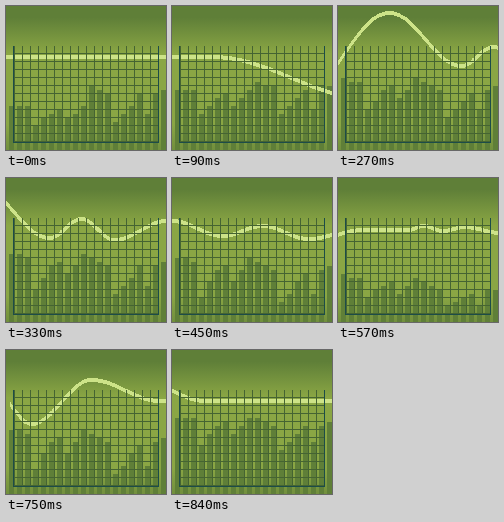
Recreate the animation shown at these times as an HTML page with a canvas. Size 160x144 px, loop 0.87 s.

```html
<!DOCTYPE html>
<html lang="en">
<head>
<meta charset="utf-8">
<title>Chart</title>
<style>
html, body { margin: 0; height: 100%; overflow: hidden; background: #5f7f38; }
canvas { display: block; width: 100vw; height: 100vh; image-rendering: pixelated; }
</style>
</head>
<body>
<canvas id="stage" width="160" height="144"></canvas>
<script>
const W = 160, H = 144, LOOP = 870, STEP = 30, SPEED = 40 / STEP;
const DARK = '#5f7f38', LIGHT = '#8aa644', GLOW = '#cde388', GRID = '#456432', FRAME = '#1c4c48';
const LEFT = 7, RIGHT = 152, TOP = 40, BASE = 136, CELL = 8, BARS = 20;
const ctx = document.getElementById('stage').getContext('2d');

// Turning points of the scrolling signal: [distance, y]
const turns = [
  [0, 51], [160, 51], [318, 93], [411, 7], [483, 60], [515, 41], [548, 62],
  [600, 43], [650, 58], [690, 48], [736, 61], [785, 52], [830, 52], [845, 48],
  [865, 53], [886, 49], [922, 55], [948, 47], [968, 56], [992, 47], [1025, 74],
  [1085, 30], [1153, 51], [LOOP * SPEED, 51]
];
const GAP = [995, 1004];

// Peaks and dips of the bar skyline: [bar, height]
const skyline = [
  [0, 56], [2, 52], [3, 17], [5, 44], [6, 48], [7, 32], [9, 56],
  [12, 44], [13, 11], [16, 40], [17, 19], [18, 44], [20, 48]
];

// Loudness over the loop: 0 low, 1 skyline, 2 high
const loudness = [[0, 1.35], [180, 1.85], [330, 1.35], [450, 1], [570, 0.55], [660, 0], [840, 2], [LOOP, 1.35]];

const mix = (a, b, k) => a + (b - a) * k;
const linear = k => k;
const sine = k => (1 - Math.cos(Math.PI * k)) / 2;

function follow(keys, at, ease = linear) {
  const i = keys.findIndex(key => key[0] > at);
  const [from, a] = keys[i - 1], [to, b] = keys[i];
  return mix(a, b, ease((at - from) / (to - from)));
}

function signalAt(distance) {
  const period = LOOP * SPEED;
  return follow(turns, (distance + period) % period, sine);
}

function barHeight(i, t) {
  const mid = follow(skyline, i);
  const low = mix(18, -6, i / BARS);
  const high = 30 + 0.7 * mid;
  const level = follow(loudness, t);
  const height = level < 1 ? mix(low, mid, level) : mix(mid, high, level - 1);
  const sag = i < BARS / 2 ? 0.4 * Math.max(0, 1 - t / 150) : 0;
  return Math.round(height * (1 - sag) / 4) * 4;
}

function rect(color, x, y, w, h) {
  ctx.fillStyle = color;
  ctx.fillRect(x, y, w, h);
}

function drawBackground() {
  const shade = ctx.createLinearGradient(0, 0, 0, H);
  shade.addColorStop(0.08, DARK);
  shade.addColorStop(0.33, LIGHT);
  shade.addColorStop(0.82, LIGHT);
  shade.addColorStop(1, '#718f3d');
  rect(shade, 0, 0, W, H);
}

function drawBars(t) {
  for (let i = 0; i < BARS; i++) {
    const y = BASE - barHeight(i, t);
    rect(DARK, i * CELL + 3, y, 5, H - y);
  }
}

function drawSignal(t) {
  for (let x = 0; x < W; x++) {
    const u = t * SPEED + x;
    if (u > GAP[0] && u < GAP[1]) continue;
    const slope = signalAt(u + 0.5) - signalAt(u - 0.5);
    const h = Math.round(4 * Math.sqrt(Math.hypot(1, slope)));
    rect(GLOW, x, Math.round(signalAt(u) - h / 2), 1, h);
  }
}

function drawGrid() {
  for (let x = LEFT + 1; x < RIGHT; x += CELL) rect(GRID, x, TOP, 1, BASE - TOP);
  for (let y = TOP + CELL - 1; y < BASE; y += CELL) rect(GRID, LEFT, y, RIGHT - LEFT, 1);
  rect(FRAME, LEFT, TOP, 1, BASE - TOP);
  rect(FRAME, RIGHT, TOP, 1, BASE - TOP);
  rect(FRAME, LEFT, BASE, RIGHT - LEFT + 1, 1);
}

function draw(now) {
  const t = Math.floor(now % LOOP / STEP) * STEP;
  drawBackground();
  drawBars(t);
  drawSignal(t);
  drawGrid();
}

const begin = performance.now();

function tick() {
  draw(performance.now() - begin);
  requestAnimationFrame(tick);
}

tick();
</script>
</body>
</html>
```
